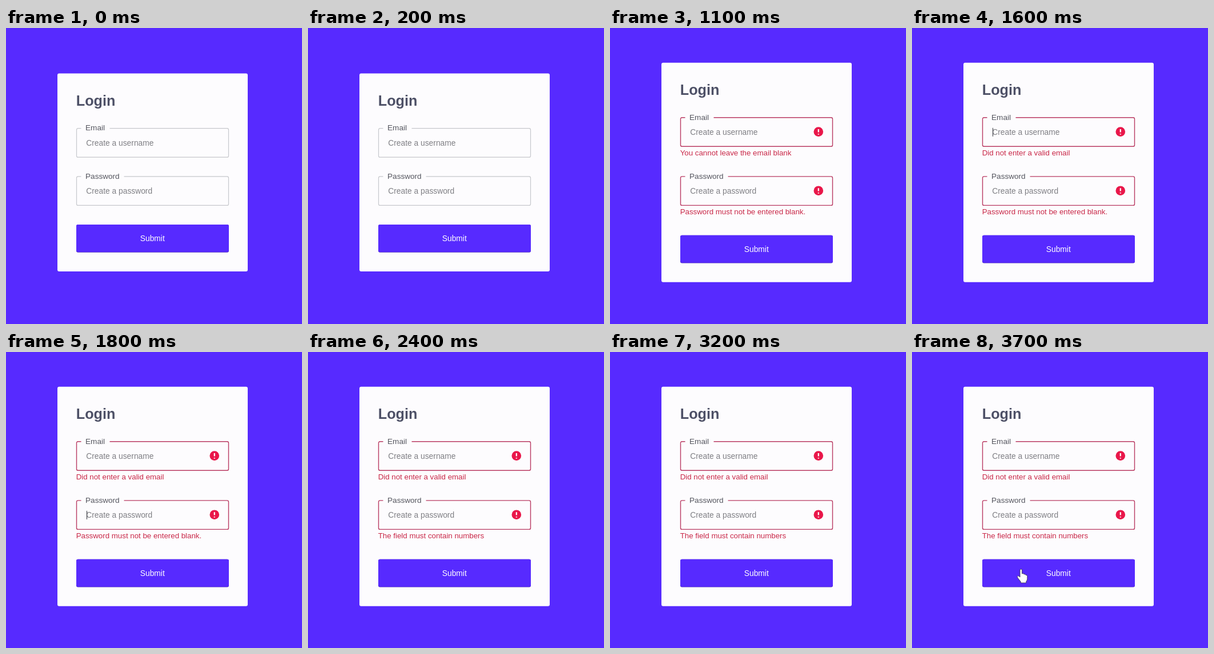
Write an HTML page that moves like this. It is 518 by 518 pixels and loops after 3800 ms.

```html
<!DOCTYPE html>
<html lang="en">
<head>
<meta charset="utf-8">
<title>Login form validation</title>
<style>
  html, body { margin: 0; width: 100%; height: 100%; overflow: hidden; background: #572aff; }
  svg { display: block; width: 100%; height: 100%; }
  text { font: 13.8px "Liberation Sans", Arial, sans-serif; }
  .title { font-size: 25.2px; font-weight: bold; fill: #4d5066; }
  .label { font-size: 13.6px; fill: #55565f; }
  .hint { fill: #7f7f84; }
  .error { font-size: 13.3px; fill: #c92848; }
  .border { fill: none; stroke: #c6c7cc; stroke-width: 1.2; }
  .invalid .border { stroke: #b93a62; stroke-width: 1.4; }
  .alert { visibility: hidden; }
  .invalid .alert { visibility: visible; }
  .pointer { stroke-linejoin: round; fill: #fff; stroke: #33303f; }
</style>
</head>
<body>
<svg id="stage" viewBox="0 0 518 518"></svg>
<script>
const LOOP = 3800;
const stage = document.getElementById('stage');

// Fields are drawn from their top border; the legend leaves a gap up to gapEnd.
const field = (id, label, hint, gapEnd) => `
  <g id="${id}">
    <path class="border" d="M${gapEnd} 0H387q2.5 0 2.5 2.5V48q0 2.5 -2.5 2.5H126q-2.5 0 -2.5 -2.5V2.5q0 -2.5 2.5 -2.5H131.5"/>
    <text class="label" x="139" y="3.7">${label}</text>
    <text class="hint" x="140.3" y="30">${hint}</text>
    <path class="caret" d="M141.5 18V33" stroke="#33343c"/>
    <g class="alert">
      <circle cx="364.8" cy="24.8" r="8.3" fill="#e9174a"/>
      <path d="M364.8 20.3V25.6M364.8 28.2V29.6" stroke="#fff" stroke-width="2.2"/>
      <text class="error" x="122.7" y="66.3"></text>
    </g>
  </g>`;

stage.innerHTML = `
  <rect width="518" height="518" fill="#572aff"/>
  <rect id="card" x="90" width="333" rx="3" fill="#fdfcfe"/>
  <text id="title" class="title" x="122.8">Login</text>
  ${field('email', 'Email', 'Create a username', 181.5)}
  ${field('password', 'Password', 'Create a password', 206.5)}
  <g id="submit">
    <rect x="123" width="267" height="48.7" rx="3" fill="#4724bd"/>
    <rect x="123" width="267" height="47.9" rx="3" fill="#572aff"/>
    <text x="256.3" y="29" fill="#fff" text-anchor="middle">Submit</text>
  </g>
  <path id="arrow" class="pointer" d="M0 0V16.5L3.8 13 6.6 19 9.4 17.7 6.8 12H11.5Z"/>
  <path id="hand" class="pointer" stroke-width=".8" d="M5 14V2Q5 0 6.8 0T8.6 2V8Q11 6.6 12 9Q14.2 8 15 10.3Q17.8 9.8 17.8 12.5V17Q17.5 20 15.8 21.5V24H6.3V22L.8 15Q-.6 12.6 1.6 11.8Q3.2 11.8 5 14Z"/>`;

const el = id => document.getElementById(id);
const moveTo = (id, x, y) => el(id).setAttribute('transform', `translate(${x} ${y})`);
const within = (t, from, to) => t >= from && t < to;

function setField(id, y, invalid, message, focused) {
  const group = el(id);
  moveTo(id, 0, y);
  group.classList.toggle('invalid', invalid);
  group.querySelector('.error').textContent = message;
  group.querySelector('.caret').style.visibility = focused ? 'visible' : 'hidden';
}

// Each stop is [time, x, y]; the pointer jumps there and stays until `end`.
function setPointer(id, t, end, stops) {
  const stop = t < end && stops.filter(s => s[0] <= t).pop();
  el(id).style.visibility = stop ? 'visible' : 'hidden';
  if (stop) moveTo(id, stop[1], stop[2]);
}

function render(t) {
  const invalid = t >= 700;
  const top = invalid ? 60.7 : 79.5;
  el('card').setAttribute('y', top);
  el('card').setAttribute('height', invalid ? 384 : 346.5);
  el('title').setAttribute('y', top + 56.5);

  setField('email', invalid ? 156.8 : 175.7, invalid,
    t < 1500 ? 'You cannot leave the email blank' : 'Did not enter a valid email',
    within(t, 1200, 1700) || within(t, 2800, 3200));
  setField('password', 259.9, invalid,
    t < 2200 ? 'Password must not be entered blank.' : 'The field must contain numbers',
    within(t, 1700, 2300));
  moveTo('submit', 0, invalid ? 362.8 : 344.1);

  if (t < 2500) setPointer('arrow', t, 1000, [[700, 207, 363], [800, 203, 328], [900, 197, 232]]);
  else setPointer('arrow', t, 2600, [[2500, 162, 231]]);
  setPointer('hand', t, LOOP, [[3600, 183, 365], [3700, 184, 380]]);
}

function tick() {
  render(performance.now() % LOOP);
  requestAnimationFrame(tick);
}
tick();
</script>
</body>
</html>
```
